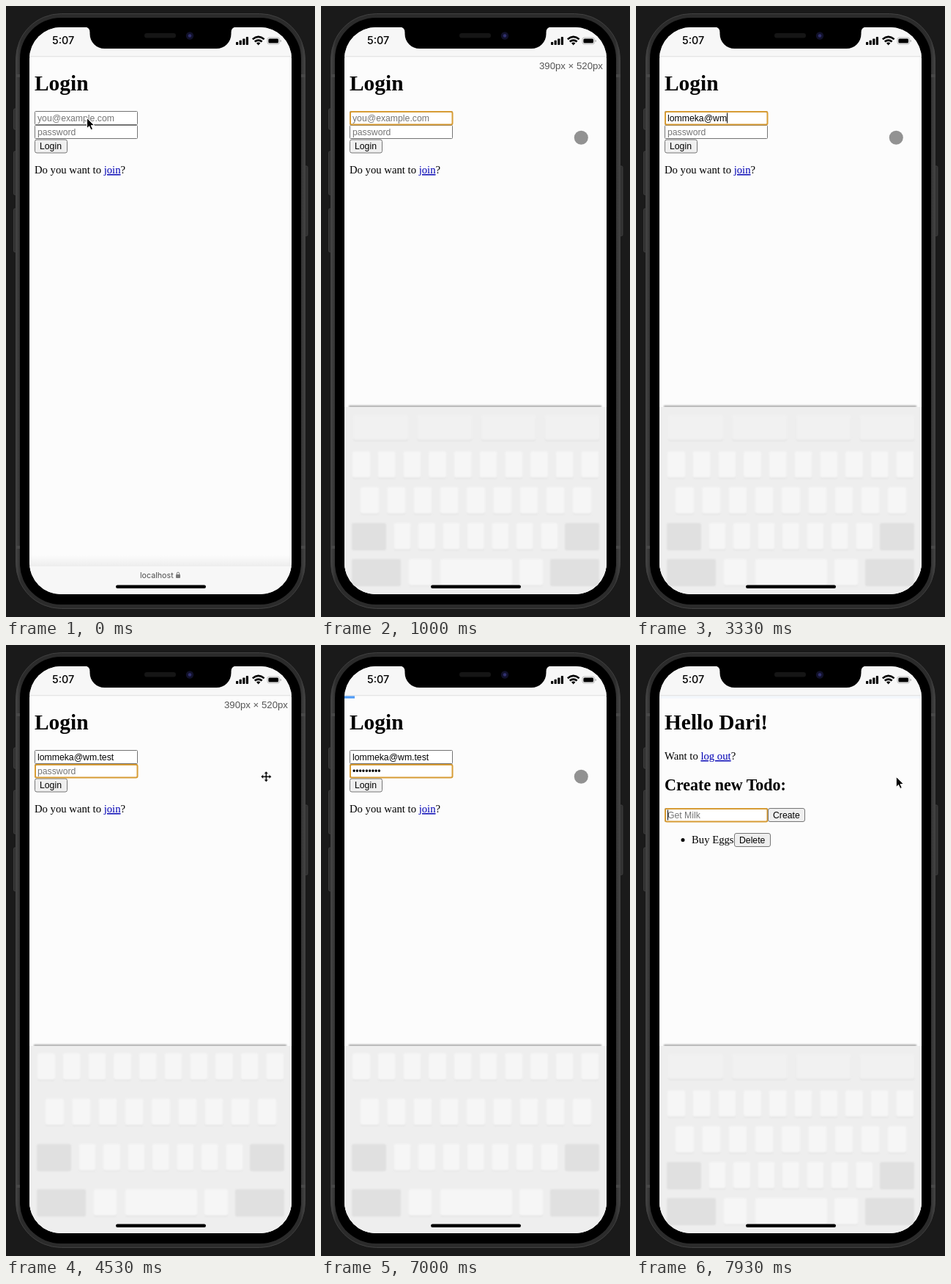
An HTML page that plays this animation: 422x832 px, repeating every 8 s.

```html
<!DOCTYPE html>
<html lang="en">
<head>
<meta charset="utf-8">
<title>Phone login</title>
<style>
  html, body { margin: 0; width: 100%; height: 100%; overflow: hidden; background: #1a1a1a; }
  svg { display: block; width: 100vw; height: 100vh; }
  text { white-space: pre; }
  .serif { font-family: "Liberation Serif", Times, serif; font-size: 14.69px; }
  .h1 { font-size: 29.38px; font-weight: bold; }
  .h2 { font-size: 22.03px; font-weight: bold; }
  .ui { font-family: "Liberation Sans", Arial, sans-serif; font-size: 12.24px; }
  .hint { fill: #757575; }
  .link { fill: #0000b4; text-decoration: underline; }
  .box { fill: #fff; stroke: #747474; }
  .button { fill: #efefef; stroke: #767676; }
  .ring { fill: none; stroke: #d79c35; stroke-width: 2; }
</style>
</head>
<body>
<svg viewBox="0 0 422 832" xmlns="http://www.w3.org/2000/svg">
  <defs>
    <clipPath id="screenClip"><rect x="32" y="29" width="358" height="772" rx="43"/></clipPath>
    <linearGradient id="barShade" x1="0" y1="0" x2="0" y2="1">
      <stop stop-color="#000" stop-opacity="0"/><stop offset="1" stop-color="#000" stop-opacity=".06"/>
    </linearGradient>
    <linearGradient id="frameEdge">
      <stop stop-color="#454545"/><stop offset=".018" stop-color="#2b2b2b"/>
      <stop offset=".982" stop-color="#2b2b2b"/><stop offset="1" stop-color="#454545"/>
    </linearGradient>
    <filter id="soft" x="-5%" y="-5%" width="110%" height="110%"><feGaussianBlur stdDeviation=".9"/></filter>
    <filter id="lineBlur" x="-5%" y="-300%" width="110%" height="700%"><feGaussianBlur stdDeviation="1.1"/></filter>
  </defs>
  <rect width="422" height="832" fill="#1a1a1a"/>

  <g fill="#303030" stroke="#454545" stroke-width=".8">
    <rect x="10.5" y="140" width="5" height="28" rx="1.5"/>
    <rect x="10.5" y="198" width="5" height="59" rx="1.5"/>
    <rect x="10.5" y="276" width="5" height="59" rx="1.5"/>
    <rect x="407" y="218" width="5" height="95" rx="1.5"/>
  </g>
  <rect x="13.5" y="10.5" width="395" height="810" rx="62" fill="url(#frameEdge)" stroke="#414141"/>
  <path d="M14 95h6M403 95h6M14 737h6M403 737h6" stroke="#484848" stroke-width="4"/>
  <rect x="19" y="16" width="384" height="799" rx="56" fill="#000"/>

  <g clip-path="url(#screenClip)">
    <rect x="32" y="29" width="358" height="772" fill="#fcfcfc"/>
    <g id="loginPage"></g>
    <g id="todoPage"></g>
    <rect id="caret" width="1" height="14" fill="#000"/>
    <text id="sizeLabel" class="ui" x="298" y="86" style="font-size:13.2px" fill="#555">390px × 520px</text>
    <rect x="32" y="748" width="358" height="15" fill="url(#barShade)"/>
    <rect x="32" y="763" width="358" height="38" fill="#f7f7f7"/>
    <text x="183" y="779" font-family="Inter, sans-serif" font-size="10.7" fill="#4c4c4c">localhost</text>
    <rect x="232" y="774" width="6" height="5" rx="1" fill="#777"/>
    <path d="M233.3 774v-1.2a1.7 1.7 0 0 1 3.4 0v1.2" fill="none" stroke="#777"/>
    <g id="keyboard">
      <rect x="38" y="544" width="345" height="3" fill="#a8a8a8" filter="url(#lineBlur)"/>
      <rect x="32" y="546" width="358" height="257" fill="#eee"/>
      <g id="keys" filter="url(#soft)"></g>
    </g>
    <rect x="150" y="788.5" width="123" height="4.5" rx="2.2" fill="#000"/>
    <rect x="32" y="29" width="358" height="40" fill="#f7f7f7"/>
    <rect x="32" y="68.3" width="358" height="1" fill="#dedede"/>
    <rect id="progress" x="32" y="69.5" height="3.2" fill="#4f9bf5"/>
  </g>

  <path d="M108 28.5q6.5 .5 6.5 7.5v2a20 20 0 0 0 20 20h153a20 20 0 0 0 20-20v-2q0-7 6.5-7.5z" fill="#000"/>
  <rect x="189" y="37" width="43" height="6.5" rx="3.2" fill="#151515"/>
  <circle cx="251" cy="40.5" r="5.2" fill="#11112a"/>
  <circle cx="251" cy="40.5" r="2.3" fill="#30306e"/>

  <text x="63" y="52" font-family="Inter, sans-serif" font-size="14.4" font-weight="500">5:07</text>
  <g id="signal"></g>
  <g fill="none" stroke="#000" stroke-width="2.5">
    <path d="M336.8 45.2q7.9-6.6 15.8 0M339.7 48.6q5-4 10 0"/>
  </g>
  <path d="M344.7 53.5l-2.7-3q2.7-2 5.4 0z"/>
  <rect x="357" y="43" width="16.5" height="9" rx="2.6" fill="none" stroke="#b5b5b5" stroke-width=".9"/>
  <rect x="358.4" y="44.4" width="13.7" height="6.2" rx="1.5"/>
  <path d="M374.6 46v3q1.3-.5 1.3-1.5t-1.3-1.5" fill="#999"/>

  <g id="cursor">
    <path id="arrow" d="M0 0v14.2l3.2-3 2.3 5 2.5-1.1-2.3-4.9h4.5z" fill="#000" stroke="#fff" stroke-width="1"/>
    <circle id="dot" r="9.5" fill="#929292"/>
    <path id="move" d="M0-7.2l3 3.2h-2v3h3v-2l3.2 3-3.2 3v-2h-3v3h2l-3 3.2-3-3.2h2v-3h-3v2l-3.2-3 3.2-3v2h3v-3h-2z" fill="#000" stroke="#fff" stroke-width=".5"/>
    <path id="beam" d="M-3-7q2.5 0 3 1.5q.5-1.5 3-1.5M0-5.5v11M-3 7q2.5 0 3-1.5q.5 1.5 3 1.5M-1.8 2h3.6" fill="none" stroke="#000" stroke-width="1.2"/>
  </g>
</svg>
<script>
const DURATION = 8000;
const EMAIL = 'lommeka@wm.test';
const EMAIL_KEYS = [2070, 2270, 2330, 2470, 2600, 2730, 2870, 3000, 3130, 3270, 3600, 3730, 3800, 3870, 3930];
const PASSWORD_KEYS = [4870, 5000, 5130, 5270, 5400, 5600, 5730, 5870, 6130];
const FOCUS_EMAIL = 400, FOCUS_PASSWORD = 4000, LOGGED_IN = 7870;
const CURSORS = [
  [0, 'arrow'], [70, 'dot'], [1400, 'arrow'], [2070, 'move'], [2930, 'dot'], [4130, 'arrow'],
  [4470, 'move'], [4730, 'arrow'], [5270, 'beam'], [6070, 'move'], [6270, 'dot'], [LOGGED_IN, 'arrow']
];

const $ = id => document.getElementById(id);
const clamp = v => Math.max(0, Math.min(1, v));
const span = (t, from, to) => clamp((t - from) / (to - from));
const lerp = (a, b, p) => a + (b - a) * p;
const easeOut = p => 1 - (1 - p) ** 3;
const easeInOut = p => p * p * (3 - 2 * p);
const show = (el, on) => el.setAttribute('visibility', on ? 'visible' : 'hidden');

const text = (cls, x, y, content, id = '') => `<text id="${id}" class="${cls}" x="${x}" y="${y}">${content}</text>`;
const rect = (cls, x, y, w, h, r) =>
  `<rect class="${cls}" x="${x}" y="${y}" width="${w}" height="${h}" rx="${r}"/>`;
const field = y => rect('box', 39.5, y + .5, 140, 18, 1);
const button = (x, y, w, label) => rect('button', x + .5, y + .5, w - 1, 18, 2.5) + text('ui', x + 7, y + 13.7, label);
const ring = (y, id = '') => `<g id="${id}">${rect('ring', 40, y + 1, 139.5, 17.5, 2)}</g>`;
const link = label => `<tspan class="link">${label}</tspan>`;

$('loginPage').innerHTML =
  text('serif h1', 39, 115, 'Login') + field(143) + field(162) +
  text('ui', 43, 157, '', 'email') + text('ui', 43, 176, '', 'password') +
  button(39, 181.5, 45, 'Login') +
  text('serif', 39, 228, `Do you want to ${link('join')}?`) +
  ring(143, 'emailRing') + ring(162, 'passwordRing');

$('todoPage').innerHTML =
  text('serif h1', 39, 115, 'Hello Dari!') +
  text('serif', 39, 156, `Want to ${link('log out')}?`) +
  text('serif h2', 39, 198, 'Create new Todo:') +
  field(222) + text('ui hint', 43, 235.7, 'Get Milk') + ring(222) + button(180, 222, 51, 'Create') +
  '<circle cx="64" cy="265.5" r="2.5"/>' + text('serif', 76, 270, 'Buy Eggs') + button(134, 256, 50, 'Delete');

$('signal').innerHTML = [0, 1, 2, 3].map(i => {
  const h = 4 + i * 2.3;
  return `<rect x="${314 + i * 4.6}" y="${53 - h}" width="3.2" height="${h}" rx=".8"/>`;
}).join('');

// Each key is [x, width, dark].
const evenKeys = (count, x, pitch, width) => Array.from({ length: count }, (_, i) => [x + i * pitch, width]);
const ROWS = [
  evenKeys(10, 43, 34.7, 24),
  evenKeys(9, 54, 36.25, 25),
  [[42, 47, true], ...evenKeys(7, 99.5, 33.45, 23), [333, 47, true]],
  [[42, 67, true], [120, 31], [163, 98], [271, 32], [313, 67, true]]
];
const keyRow = (keys, y, height, light) => keys.map(([x, w, dark]) =>
  `<rect x="${x}" y="${y + 1.2}" width="${w}" height="${height}" rx="3" fill="#dedede"/>` +
  `<rect x="${x}" y="${y}" width="${w}" height="${height}" rx="3" fill="${dark ? '#e0e0e0' : light}"/>`).join('');
$('keys').innerHTML =
  `<g>${keyRow(evenKeys(4, 44, 87.2, 75), 557, 34, '#f1f1f1')}</g>` +
  ROWS.map(keys => `<g>${keyRow(keys, 0, 36, '#f6f6f6')}</g>`).join('');
const [suggestions, ...keyRows] = $('keys').children;

function drawField(el, value, hint) {
  el.textContent = value || hint;
  el.classList.toggle('hint', !value);
}

function drawKeyboard(t) {
  const up = easeOut(span(t, 400, 930));
  $('keyboard').setAttribute('transform', `translate(0 ${lerp(262, 0, up)})`);
  show($('keyboard'), t >= 400);
  const accessory = t >= LOGGED_IN ? 1 : 1 - easeInOut(span(t, 4000, 4200));
  suggestions.setAttribute('opacity', accessory);
  keyRows.forEach((row, i) =>
    row.setAttribute('transform', `translate(0 ${lerp(556 + i * 61.7, 606.5 + i * 48.8, accessory)})`));
}

function drawCaret(t, typed, dots) {
  const focusTimes = [FOCUS_EMAIL, ...EMAIL_KEYS, FOCUS_PASSWORD, ...PASSWORD_KEYS, LOGGED_IN];
  const last = focusTimes.filter(k => k <= t).pop();
  show($('caret'), last !== undefined && (t - last) % 1000 < 500);
  let x = 43, y = 145.5;
  if (t >= LOGGED_IN) y = 224.5;
  else if (t >= FOCUS_PASSWORD) {
    y = 164.5;
    if (dots) x += $('password').getComputedTextLength();
  } else if (typed) x += $('email').getComputedTextLength();
  $('caret').setAttribute('x', x);
  $('caret').setAttribute('y', y);
}

function drawCursor(t) {
  const kind = CURSORS.filter(([time]) => time <= t).pop()[1];
  for (const name of ['arrow', 'dot', 'move', 'beam']) show($(name), name === kind);
  const p = easeInOut(span(t, 470, 950));
  $('cursor').setAttribute('transform', `translate(${lerp(110.5, 355.3, p)} ${lerp(152.5, 179.3, p)})`);
}

function render(t) {
  const typed = EMAIL_KEYS.filter(k => k <= t).length;
  const dots = PASSWORD_KEYS.filter(k => k <= t).length;
  const loggedIn = t >= LOGGED_IN;
  $('loginPage').style.display = loggedIn ? 'none' : '';
  $('todoPage').style.display = loggedIn ? '' : 'none';
  drawField($('email'), EMAIL.slice(0, typed), 'you@example.com');
  drawField($('password'), '•'.repeat(dots), 'password');
  show($('emailRing'), t >= FOCUS_EMAIL && t < FOCUS_PASSWORD);
  show($('passwordRing'), t >= FOCUS_PASSWORD);
  show($('sizeLabel'), (t >= 530 && t < 1400) || (t >= 4200 && t < 4730));
  drawKeyboard(t);
  if (!loggedIn) drawCaret(t, typed, dots);
  else drawCaret(t, 0, 0);
  drawCursor(t);
  show($('progress'), t >= 7000);
  $('progress').setAttribute('width', lerp(14, 358, easeInOut(span(t, 7000, 7750))));
  $('progress').setAttribute('opacity', 1 - .95 * span(t, 7750, 7930));
}

const start = performance.now();
function tick() {
  render((performance.now() - start) % DURATION);
  requestAnimationFrame(tick);
}
render(0);
requestAnimationFrame(tick);
</script>
</body>
</html>
```
